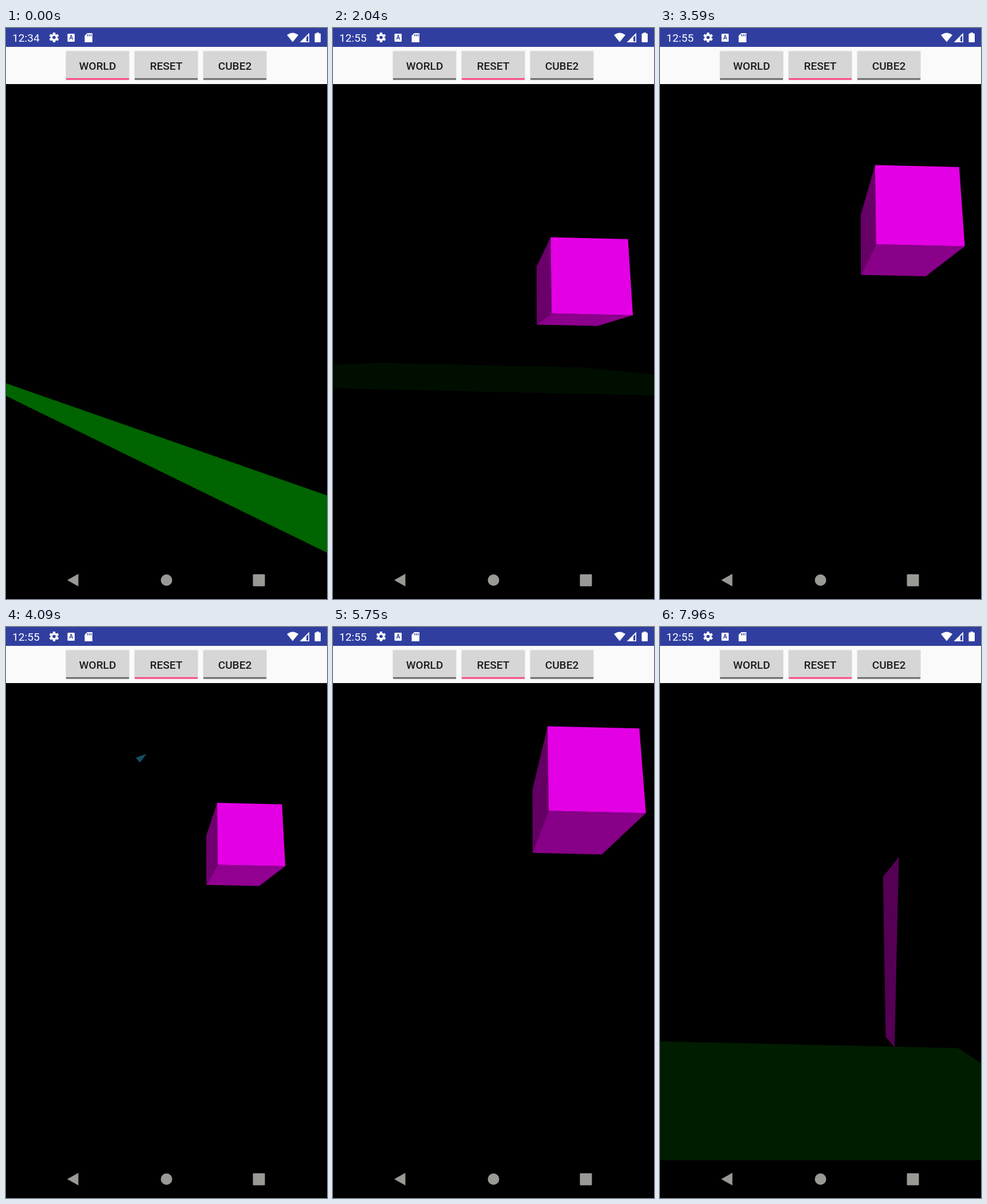
Write an HTML page with a canvas that moves like this. It is 561 by 998 pixels and loops after 8 s.

```html
<!DOCTYPE html>
<html lang="en">
<head>
<meta charset="utf-8">
<title>Cube scene</title>
<style>
  html, body { margin: 0; width: 100%; height: 100%; overflow: hidden; background: #000; }
  canvas { display: block; width: 561px; height: 998px; }
</style>
</head>
<body>
<canvas id="stage" width="561" height="998"></canvas>
<script>
const ctx = document.getElementById('stage').getContext('2d');
const LOOP = 8000, RESET_AT = 440;
const VIEW = { top: 98, bottom: 932, cx: 280.5, cy: 515, focal: 417, near: 2.53 };
const PITCH = Math.atan(0.1483), ROLL = 0.0227;

// Front lower left corner of the magenta cube as seen from the camera: time, x, y, z
const path = [
  [1090, 2.05, -0.19, 9],
  [2920, 0.85, 2.33, 2.79],
  [4090, 1.48, 2.74, 6.74],
  [5750, 1.08, 3, 4.51],
  [6750, 1.88, 1.17, 8.48],
  [7960, 0.815, -0.93, 1.04]
];

// Blue cube: time, first axis, second axis, brightness along the three axes
const spin = [
  [1090, 0.746, 0.615, 0.248, -0.643, 0.768, 0.025, 0.43, 0.3, 1],
  [4090, 0.687, 0.584, -0.433, -0.682, 0.313, -0.66, 0.93, 0.2, 0.47],
  [6750, 0.710, 0.657, -0.257, -0.697, 0.704, -0.133, 0.2, 0.2, 0.95]
];

const add = (a, b, k = 1) => a.map((v, i) => v + b[i] * k);
const dot = (a, b) => a[0] * b[0] + a[1] * b[1] + a[2] * b[2];
const cross = (a, b) => [a[1] * b[2] - a[2] * b[1], a[2] * b[0] - a[0] * b[2], a[0] * b[1] - a[1] * b[0]];
const unit = a => a.map(v => v / Math.hypot(...a));
const rgb = (color, k) => `rgb(${color.map(v => Math.round(v * k)).join()})`;

function sample(keys, t) {
  const last = keys.length - 1;
  if (t <= keys[0][0]) return keys[0].slice(1);
  if (t >= keys[last][0]) return keys[last].slice(1);
  const i = keys.findIndex(key => key[0] > t);
  const a = keys[i - 1], b = keys[i], k = (t - a[0]) / (b[0] - a[0]);
  return a.slice(1).map((v, j) => v + (b[j + 1] - v) * k);
}

function toCamera([x, y, z]) {
  const c = Math.cos(PITCH), s = Math.sin(PITCH);
  return [x, y * c - z * s, z * c + y * s];
}

function clipNear(points) {
  const out = [];
  points.forEach((p, i) => {
    const q = points[(i + 1) % points.length];
    const dp = p[2] - VIEW.near, dq = q[2] - VIEW.near;
    if (dp >= 0) out.push(p);
    if (dp * dq < 0) out.push(add(p, add(q, p, -1), dp / (dp - dq)));
  });
  return out;
}

function project([x, y, z]) {
  const px = VIEW.focal * x / z, py = -VIEW.focal * y / z;
  const c = Math.cos(ROLL), s = Math.sin(ROLL);
  return [VIEW.cx + px * c - py * s, VIEW.cy + px * s + py * c];
}

function polygon(points, color) {
  if (points.length < 3) return;
  ctx.beginPath();
  points.forEach(p => ctx.lineTo(...p));
  ctx.closePath();
  ctx.fillStyle = color;
  ctx.fill();
}

function quad(center, a, b, color) {
  const corners = [[-1, -1], [1, -1], [1, 1], [-1, 1]]
    .map(([i, j]) => add(add(center, a, i), b, j));
  polygon(clipNear(corners.map(toCamera)).map(project), color);
}

function cube(center, axes, shades, color) {
  axes.forEach((axis, i) => {
    for (const side of [-1, 1]) {
      const middle = add(center, axis, side);
      if (dot(middle, axis) * side >= 0) continue;
      quad(middle, axes[(i + 1) % 3], axes[(i + 2) % 3], rgb(color, shades[i]));
    }
  });
}

function drawScene(t) {
  const corner = sample(path, t);
  const [, y, z] = corner;

  const ground = y - 1.474;
  if (ground < 0) {
    quad(add(corner, [-1.93, -1.474, 0.98]), [5, 0, 0], [0, 0, 5], rgb([0, 1, 0], 12 - 7 * ground));
  }

  cube(add(corner, [1, 1, 1]), [[1, 0, 0], [0, 1, 0], [0, 0, 1]],
    [0.35 + 0.02 * z, 0.5 + 0.02 * z, 1], [228, 0, 228]);

  const pose = sample(spin, t);
  const u = unit(pose.slice(0, 3)), raw = pose.slice(3, 6);
  const v = unit(add(raw, u, -dot(raw, u)));
  cube(add(corner, [-2.05, 0.97, -4.93]), [u, v, cross(u, v)], pose.slice(6), [46, 171, 226]);
}

function rect(x, y, w, h, color, radius = 0) {
  ctx.fillStyle = color;
  ctx.beginPath();
  ctx.roundRect(x, y, w, h, radius);
  ctx.fill();
}

function disc(x, y, r, color) {
  ctx.fillStyle = color;
  ctx.beginPath();
  ctx.arc(x, y, r, 0, Math.PI * 2);
  ctx.fill();
}

function label(text, x, y, font, color, align) {
  ctx.font = font + ' Roboto, sans-serif';
  ctx.fillStyle = color;
  ctx.textAlign = align;
  ctx.fillText(text, x, y);
}

function drawStatusBar(clock) {
  const bar = '#303f9f', white = '#fff';
  rect(0, 0, 561, 33, bar);
  label(clock, 11, 24, '400 19.2px', white, 'left');

  for (let i = 0; i < 6; i++) {
    ctx.save();
    ctx.translate(84, 16.5);
    ctx.rotate(i * Math.PI / 3);
    rect(-2.2, -8.5, 4.4, 5, white, 0.8);
    ctx.restore();
  }
  disc(84, 16.5, 6.3, white);
  disc(84, 16.5, 2.8, bar);

  rect(107.5, 10, 12.5, 14, white, 1.2);
  label('A', 113.8, 20, '700 10px', bar, 'center');

  polygon([[142, 9], [151, 9], [151, 25], [137.5, 25], [137.5, 13.5]], white);
  for (const x of [142, 145, 148]) rect(x, 11, 1.4, 3.5, bar);

  ctx.fillStyle = white;
  ctx.beginPath();
  ctx.moveTo(501, 24.5);
  ctx.lineTo(491, 12.3);
  ctx.quadraticCurveTo(501, 4.5, 511, 12.3);
  ctx.fill();

  polygon([[530, 8.5], [530, 25], [513.5, 25]], white);
  polygon([[528.3, 13], [528.3, 23.4], [525, 23.4], [525, 16.3]], bar);

  rect(542.5, 8, 4.5, 3, white);
  rect(539.5, 9.5, 10.5, 15.5, white, 1.2);
}

function drawButtons(active) {
  rect(0, 33, 561, 65, '#fafafa');
  ['WORLD', 'RESET', 'CUBE2'].forEach((name, i) => {
    const x = 105 + 120 * i;
    rect(x - 1, 39.5, 112, 52, '#e6e6e6', 2);
    rect(x, 41, 110, 49.5, '#d6d6d6', 1.5);
    rect(x, 87.7, 110, 2.8, name === active ? '#ff4081' : '#666');
    label(name, x + 55, 72.8, '500 19.1px', '#1c1c1c', 'center');
  });
}

function drawNavigation() {
  const gray = '#999996';
  rect(0, VIEW.bottom, 561, 998 - VIEW.bottom, '#000');
  polygon([[107, 965], [126.5, 954], [126.5, 976]], gray);
  disc(280.5, 965, 10, gray);
  rect(431.5, 954.7, 21, 21, gray, 1.5);
}

function frame() {
  const t = performance.now() % LOOP;
  const before = t < RESET_AT;
  rect(0, 0, 561, 998, '#000');
  if (before) polygon([[0, 621], [561, 817], [561, 917], [0, 643]], '#006400');
  else drawScene(t);
  drawStatusBar(before ? '12:34' : '12:55');
  drawButtons(before ? 'WORLD' : 'RESET');
  drawNavigation();
  requestAnimationFrame(frame);
}
requestAnimationFrame(frame);
</script>
</body>
</html>
```
